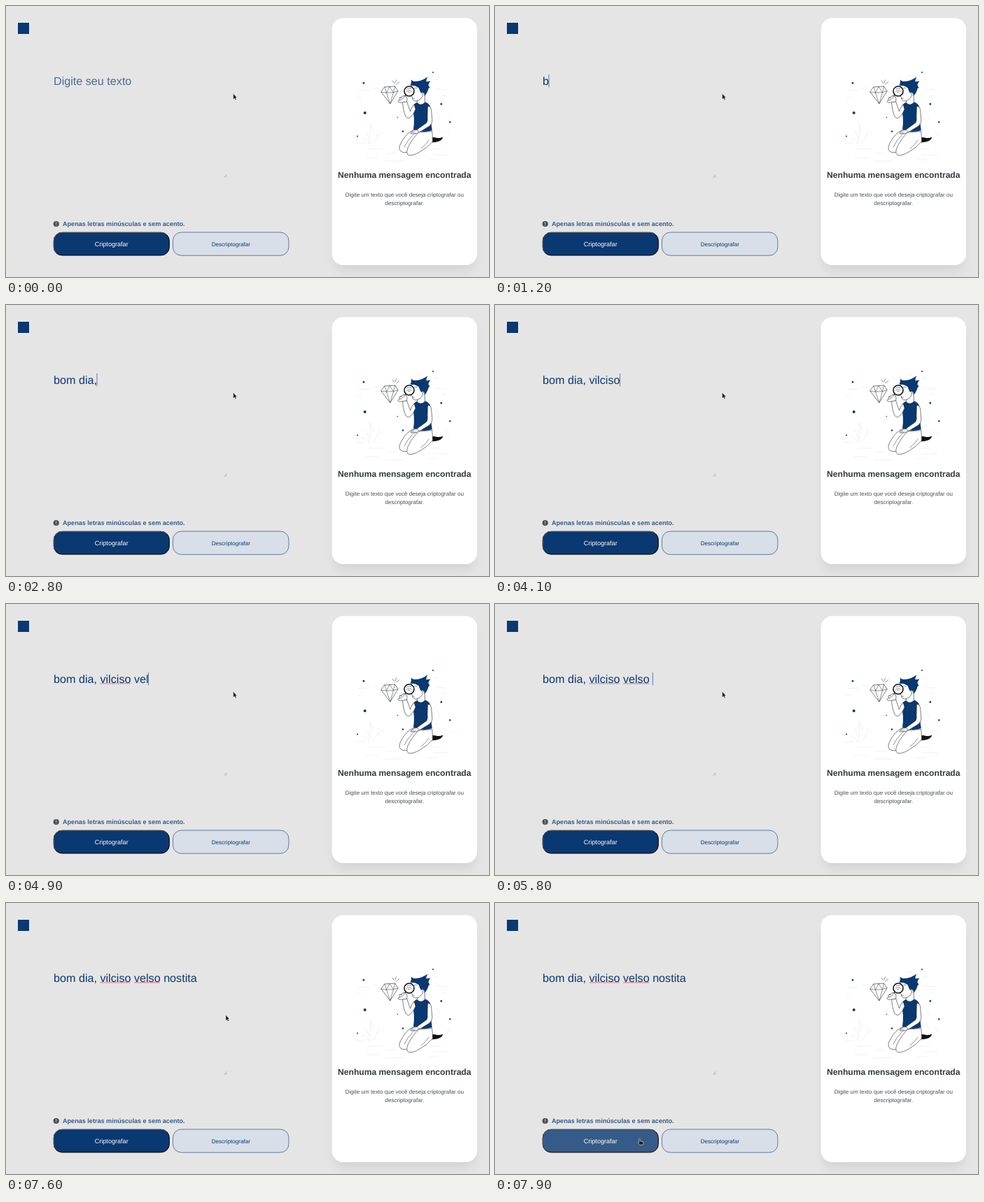
An HTML page that plays this animation: 690 by 388 pixels, repeating every 8000 ms.

```html
<!DOCTYPE html>
<html lang="pt-BR">
<head>
<meta charset="utf-8">
<title>Criptografar texto</title>
<style>
  html, body { margin: 0; width: 100%; height: 100%; overflow: hidden; background: #e5e5e5; }
  svg { display: block; width: 690px; height: 388px; }
  text { font-family: "Liberation Sans", Arial, sans-serif; text-rendering: geometricPrecision; white-space: pre; }
  .mid { text-anchor: middle; }
  .bold { font-weight: 700; }
  .ink { fill: #fff; stroke: #25282c; stroke-width: .6; stroke-linejoin: round; stroke-linecap: round; }
  .line { fill: none; stroke: #33373c; stroke-width: .55; stroke-linecap: round; stroke-linejoin: round; }
  .faint { fill: none; stroke: #eaeaea; stroke-width: .7; stroke-linecap: round; }
  .navy { fill: #0a3871; }
</style>
</head>
<body>
<svg viewBox="0 0 690 388">
  <defs>
    <filter id="soft" x="-20%" y="-20%" width="140%" height="140%"><feGaussianBlur stdDeviation="8"/></filter>
  </defs>
  <rect width="690" height="388" fill="#e5e5e5"/>
  <rect class="navy" x="17" y="24" width="16" height="16"/>

  <!-- result card -->
  <rect x="469.6" y="33.3" width="199.4" height="345.8" rx="12" opacity=".08" filter="url(#soft)"/>
  <rect x="465.6" y="17.2" width="207.4" height="353.8" rx="16.2" fill="#fff"/>

  <!-- background sketch -->
  <g class="faint">
    <path d="M504 121l16-1M524 118l8-1M501 131h7M588 100l8-1M611 106l6-1M614 119l15 1M622 128h6"/>
    <path d="M518 198Q522 182 520 168L525 180M519 190L513 178M519 197Q515 190 508 189M522 198Q530 192 533 177M531 186L539 181"/>
    <path d="M499 197h14M517 205h22M543 211h15M514 217h18M541 222h27M606 205h15M610 213h22M603 220h14"/>
    <path d="M612 150q8 3 7 12M626 178l8 7M614 171l6 9"/>
  </g>
  <g id="dots" class="navy"></g>

  <!-- diamond -->
  <path class="ink" d="M541 116L555.5 115L560 121.8L548.8 140L536 123.2Z"/>
  <path class="line" d="M536 123.2L543.5 124.2L553.5 123.7L560 121.8M541 116L543.5 124.2L548 115.5L553.5 123.7L555.5 115M543.5 124.2L548.8 140L553.5 123.7"/>
  <path class="line" d="M552 107l2.4 3.6M557.6 105.8l-1.6 4M561.7 108.7l-4 3.3"/>

  <!-- vest -->
  <path class="navy" d="M587 138Q592 143.5 598.5 137.5Q604.5 139 606.5 145Q606 160 608.8 178Q595 182.5 582 176.5Q584.5 161 580.5 145.5Q582 140 587 138Z"/>

  <!-- legs and shoe -->
  <path d="M604 190Q609 187 614 188.5Q620 190 624 187.5Q624 191 619 193.5Q613 196 606 195Z" fill="#101214"/>
  <path class="ink" d="M582 177.5Q572 182 566 193Q559 204 564 208Q569 212 581 207L604 194L596 181Z"/>
  <path class="ink" d="M590 180.5Q580 190 574 203Q571 211 575 213.5Q581 215 591 209Q602 203 609.5 194Q609.5 185 608.5 179Q600 181 590 180.5Z"/>
  <path class="line" d="M581 185Q573 193 569 202M593 204Q600 199 604 192"/>

  <!-- raised arm -->
  <path class="ink" d="M583 141Q579 145 577.5 151L572.5 136.5L566.5 137.5Q567.5 151 571 158Q574 162.5 578 159Q583 154 585 148Z"/>
  <!-- neck and head -->
  <path class="ink" d="M588 129L587.3 138.5Q593 144 598.5 138L598 124Z"/>
  <path class="ink" d="M580.5 111Q578.5 118 580 124L578.2 129L580.4 130.2Q580.5 136.3 586 136Q592 135 595 129L597 115Q590 108 580.5 111Z"/>
  <path class="line" d="M580.8 132.2h2.6M583 118q2-1.8 4.2-.5"/>
  <path class="navy" d="M577.5 114Q579.5 110.5 578.8 105.5Q581.5 108.6 585 108Q594 107.5 602.4 101.5Q600 105.5 600.3 108.3Q603.5 108.3 606.5 107.6Q603.4 110.5 603.4 113.2Q604 115 605.5 116.5Q603 117.8 602.8 121Q601 126 597.5 129Q598.5 124 595.5 123.5Q593.6 123.5 593.5 125.5Q591 122 589.5 117Q583.5 113 577.5 114Z"/>

  <!-- lowered arm -->
  <path class="ink" d="M602.5 144Q606.5 142.5 607.6 149L608.8 163Q609 169 604 172.5L590 181L586.5 177.5L600.5 167.5Q602.8 165 602 159Z"/>
  <path class="ink" d="M587 177.3Q582.5 177.4 579.5 180Q576.5 182.6 579.3 183.2Q585 184 590.2 180.8Z"/>
  <path class="line" d="M579.6 181.8l3.4-1.4M582 183l2.8-1.3"/>

  <!-- magnifier and hand -->
  <circle cx="576" cy="122" r="7" fill="#fff" stroke="#111315" stroke-width="1.6"/>
  <path class="line" d="M572 122.5q3.8-3.4 7.4-.4M572.5 119q3-2 6.5-.6M574.4 123.4h2.8"/>
  <path d="M571.2 127.2L566 134" stroke="#111315" stroke-width="1.3"/>
  <path class="ink" d="M566.5 138Q561 139 559.8 136.8Q560 134.8 563 134.7Q560.6 133 562.5 131.2L566 130Q567 127.4 569.5 128.8Q573 129 573 133L572.6 136.7Z"/>
  <path class="line" d="M563 134.7l3-.8M562.8 131.6l3.8.5M568.7 129.3l-.6 3"/>

  <text class="mid bold" x="569.3" y="246.1" font-size="12.12" fill="#343a40">Nenhuma mensagem encontrada</text>
  <g class="mid" font-size="8.08" fill="#495057">
    <text x="569.3" y="273.2">Digite um texto que você deseja criptografar ou</text>
    <text x="569.3" y="285.3">descriptografar.</text>
  </g>

  <!-- text area -->
  <text id="hint" x="68" y="112.7" font-size="16.16" fill="#0a3871" opacity=".7">Digite seu texto</text>
  <text id="entry" x="68" y="112.7" font-size="16.16" fill="#0a3871"></text>
  <path id="wave" fill="none" stroke="#e3435d" stroke-width=".75"/>
  <rect id="caret" class="navy" y="98" width=".6" height="18.4"/>
  <path d="M311.5 245.5l4-4M314 245.8l1.6-1.6" stroke="#777" stroke-width=".6"/>

  <circle cx="71.7" cy="312" r="4.1" fill="#495057"/>
  <path d="M71.7 309.5v2.9M71.7 313.4v1" stroke="#e5e5e5" stroke-width=".9"/>
  <text class="bold" x="81" y="315" font-size="9.09" fill="#0a3871" opacity=".8">Apenas letras minúsculas e sem acento.</text>

  <!-- buttons -->
  <rect id="btn" x="68.3" y="324.3" width="165" height="32.7" rx="11.7" stroke="#000"/>
  <path d="M71.4 353.2A11.7 11.7 0 0 1 68.3 345.3V336A11.7 11.7 0 0 1 80 324.3H221.6A11.7 11.7 0 0 1 229.8 327.7" fill="none" stroke="#565a60"/>
  <text class="mid" x="150.7" y="343.9" font-size="9.09" fill="#fff">Criptografar</text>
  <rect x="238.5" y="324" width="165.4" height="33.2" rx="12" fill="#d8dfe8" stroke="#0a3871" stroke-width=".6"/>
  <text class="mid" x="321.3" y="343.6" font-size="8.08" fill="#0a3871">Descriptografar</text>

  <path id="arrow" d="M0 0V8L1.8 6.4L3 9L4.3 8.4L3.1 5.9H5.3Z" fill="#161616" stroke="#fff" stroke-width=".35"/>
  <path id="hand" transform="translate(204 337)" d="M1.6 .8Q2.6-.2 3.3.9V4L6.8 4.6Q8.3 4.8 8.1 6.2L7.2 9.4H2.9L.5 6.6Q.2 5.4 1.6 5.8Z" fill="#222" stroke="#eee" stroke-width=".6"/>
</svg>
<script>
const $ = id => document.getElementById(id);
const show = (el, on) => el.setAttribute("visibility", on ? "visible" : "hidden");
const LOOP = 8000, LEFT = 68;
const phrase = "bom dia, vilciso velso nostita";
// key times in tenths of a second
const keys = [12, 13, 15, 18, 19, 20, 22, 28, 30, 31, 33, 35, 36, 38, 39, 41, 43,
  45, 46, 49, 50, 53, 58, 60, 62, 65, 66, 68, 69, 70];
const flagged = [[9, 16], [17, 22]];

const pen = document.createElement("canvas").getContext("2d");
pen.font = '161.6px "Liberation Sans", Arial, sans-serif';
const edge = n => LEFT + pen.measureText(phrase.slice(0, n)).width / 10;

const dots = [[511, 110.3, 1.4], [512.7, 153, 2], [610, 95, 1], [621.8, 140.4, 1.4],
  [634.3, 166.3, 1.2], [567, 179.5, 1.2], [502, 186.5, 1], [559.3, 159.5, .8]];
$("dots").innerHTML = dots.map(([x, y, r]) => `<circle cx="${x}" cy="${y}" r="${r}"/>`).join("");

function squiggle([from, to]) {
  const end = edge(to);
  let x = edge(from), d = `M${x} 114.2`;
  for (let i = 0; x + 1 <= end; i++) d += `L${x += 1} ${i % 2 ? 114.2 : 113.7}`;
  return d;
}
const waves = flagged.map(squiggle);

function pointer(tick) {
  if (tick < 73) return [324.7, 125.6];
  if (tick < 74) return [327.5, 126.4];
  if (tick < 76) return [334, 127.6];
  const p = (tick - 75) / 4, e = p * p * (3 - 2 * p);
  return [334 - 128 * e, 127.6 + 210 * e];
}

function draw(ms) {
  const tick = Math.floor(ms / 100);
  const n = keys.filter(k => k <= tick).length;
  const last = n ? keys[n - 1] : 1;
  $("entry").textContent = phrase.slice(0, n);
  show($("hint"), !n);
  show($("caret"), tick >= last && tick - last < 6);
  $("caret").setAttribute("x", edge(n) - .3);
  $("wave").setAttribute("d", waves.filter((_, i) => n > flagged[i][1]).join(""));

  const [x, y] = pointer(tick);
  const over = y > 324;
  $("btn").setAttribute("fill", over ? "#365b88" : "#0a3871");
  $("arrow").setAttribute("transform", `translate(${x} ${y})`);
  show($("arrow"), !over);
  show($("hand"), over);
}

let start;
function frame(now) {
  start ??= now;
  draw((now - start) % LOOP);
  requestAnimationFrame(frame);
}
draw(0);
requestAnimationFrame(frame);
</script>
</body>
</html>
```
